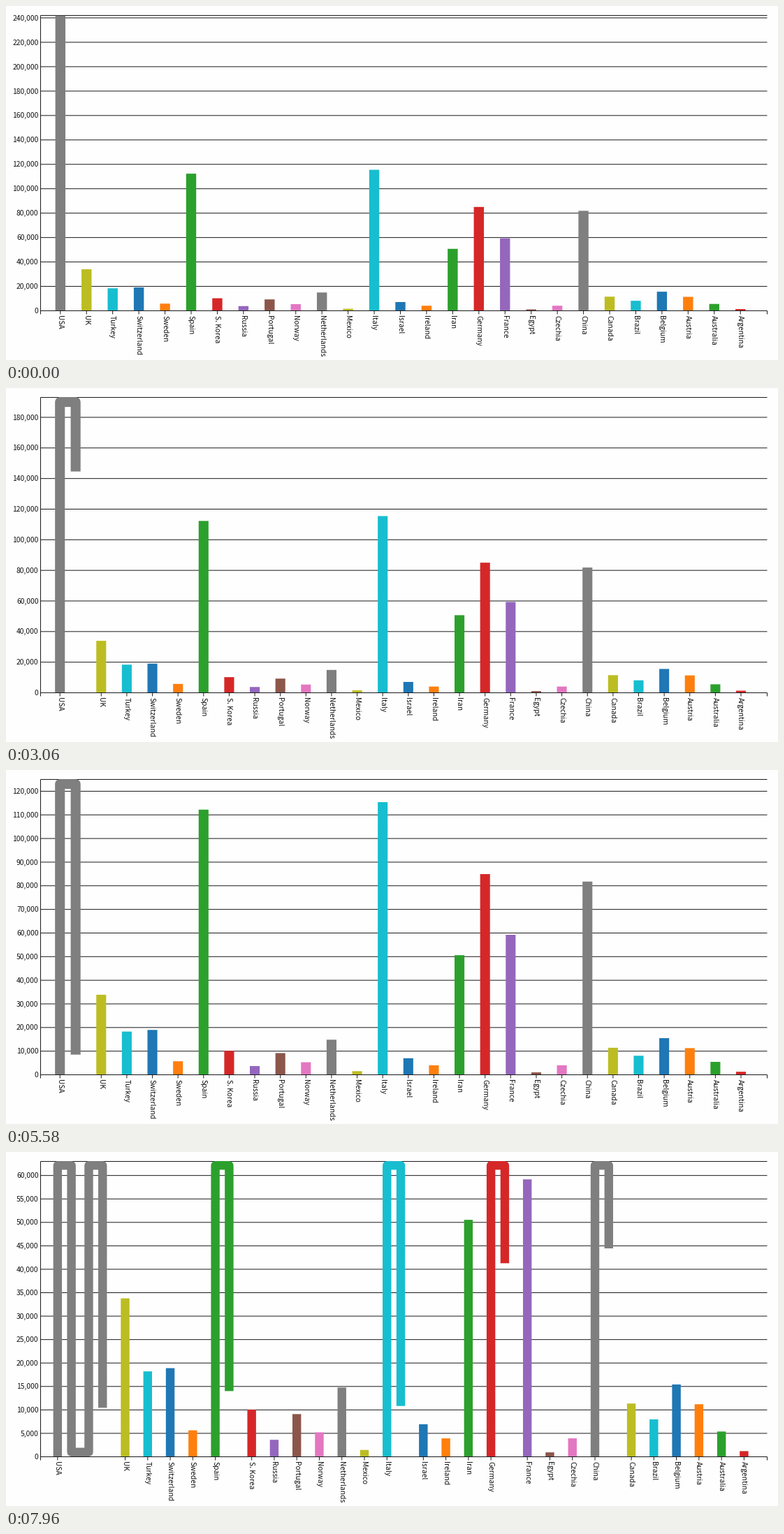
Recreate the animation shown at these times as a matplotlib script. Size 1105 by 507 pixels, loop 8 s.

```python
import math

import matplotlib.pyplot as plt
import numpy as np
from matplotlib.animation import FuncAnimation
from matplotlib.collections import LineCollection

W, H, DPI = 1105, 507, 64
LOOP, STEP = 8000, 40
LEFT, RIGHT, TOP, BASE = 49, 1089, 13, 436
INK, PAPER = "#1a1a1e", "#fefefe"
PX = 72 / DPI  # points per pixel

# Horizontal layout in units of the bar spacing
FIRST, SPAN, BAR = 0.77, 27.78, 0.385
TURN = (0.613, 0.77)  # fold at the top, fold at the base

DATA = [
    ("USA", 241.62), ("UK", 33.72), ("Turkey", 18.14), ("Switzerland", 18.83),
    ("Sweden", 5.57), ("Spain", 112.06), ("S. Korea", 9.98), ("Russia", 3.55),
    ("Portugal", 9.03), ("Norway", 5.15), ("Netherlands", 14.7),
    ("Mexico", 1.38), ("Italy", 115.24), ("Israel", 6.86), ("Ireland", 3.85),
    ("Iran", 50.47), ("Germany", 84.79), ("France", 59.1), ("Egypt", 0.87),
    ("Czechia", 3.86), ("China", 81.62), ("Canada", 11.28), ("Brazil", 7.91),
    ("Belgium", 15.35), ("Austria", 11.13), ("Australia", 5.31),
    ("Argentina", 1.13),
]

# The upper limit drops in bursts: start, end, number of changes
RUNS = [(1310, 2100, 17), (2130, 2930, 16), (2960, 3750, 18), (3820, 4620, 18),
        (4680, 5480, 19), (5580, 6370, 16), (6410, 7200, 17), (7240, 7960, 17)]
CHANGES = np.concatenate([[0, 890]] + [np.linspace(*run) for run in RUNS])
KEY_T = [0, 890, 1310, 1804, 3053, 4858, 6212, 6953, 7960]
KEY_LIMIT = [242, 241, 240, 227, 193, 146, 107, 89, 63]


def limit_at(t):
    last = CHANGES[np.searchsorted(CHANGES, t, side="right") - 1]
    return round(float(np.interp(last, KEY_T, KEY_LIMIT)))


def tick_step(limit):
    raw = limit / 10
    power = 10 ** math.floor(math.log10(raw))
    ratio = raw / power
    for bound, factor in ((50, 10), (10, 5), (2, 2)):
        if ratio >= math.sqrt(bound):
            return round(factor * power)
    return round(power)


def turns(folds):
    return sum(TURN[j % 2] for j in range(folds))


def ribbon(x, value, limit, gap):
    """Centre line of a bar that folds back at the limits."""
    folds = int(value // limit)
    rest = (value - folds * limit) * (BASE - TOP) / limit
    half = BAR * gap / 2
    pts = [(x, BASE)]
    for j in range(folds):
        y = BASE - half if j % 2 else TOP + half
        pts.append((x, y))
        x += TURN[j % 2] * gap
        pts.append((x, y))
    pts.append((x, TOP + rest if folds % 2 else BASE - rest))
    return zip(*pts)


fig = plt.figure(figsize=(W / DPI, H / DPI), dpi=DPI, facecolor=PAPER)
ax = fig.add_axes([0, 0, 1, 1])
ax.set_xlim(0, W)
ax.set_ylim(H, 0)
ax.axis("off")

FONT = dict(family="Noto Sans CJK JP", weight="medium", size=10.25 * PX,
            color="#111111", va="baseline")

rules = LineCollection([], colors=INK, linewidths=PX, zorder=1)
rules.set_snap(False)
ax.add_collection(rules, autolim=False)

bars, names = [], []
for i, (name, _) in enumerate(DATA):
    bar, = ax.plot([], [], color=f"C{(i + 7) % 10}", zorder=2, snap=False,
                   solid_capstyle="butt", solid_joinstyle="round")
    bars.append(bar)
    names.append(ax.text(0, 443.4, name, ha="left", rotation=270,
                         rotation_mode="anchor", **FONT))
scale = [ax.text(46.6, 0, "", ha="right", **FONT) for _ in range(16)]

l, r, b, t = LEFT + 0.5, RIGHT + 0.5, BASE + 0.5, TOP + 0.5
FRAME = [[(l, t), (r, t)], [(l, t), (l, b + 5)],
         [(l, b), (r, b)], [(r, b), (r, b + 5)]]


def draw(k):
    limit = limit_at(k * STEP + STEP / 2)
    lines = list(FRAME)

    step = tick_step(limit)
    for i, label in enumerate(scale):
        value = i * step
        label.set_visible(value <= limit)
        if value <= limit:
            y = BASE + 0.5 - (BASE - TOP) * value / limit
            label.set_text(f"{value * 1000:,}")
            label.set_y(y + 3.6)
            if value:
                lines.append([(l, y), (r, y)])

    widths = [turns(int(v // limit)) for _, v in DATA]
    gap = (RIGHT - LEFT) / (SPAN + sum(widths))
    x = LEFT + FIRST * gap
    for (_, value), extra, bar, name in zip(DATA, widths, bars, names):
        bar.set_data(*ribbon(x, value, limit, gap))
        bar.set_linewidth(BAR * gap * PX)
        name.set_x(x - 3.6)
        lines.append([(x, b), (x, b + 5)])
        x += (1 + extra) * gap

    rules.set_segments(lines)
    return [rules, *bars, *names, *scale]


anim = FuncAnimation(fig, draw, frames=LOOP // STEP, interval=STEP,
                     repeat=True, repeat_delay=0, blit=False)
plt.show()
```
